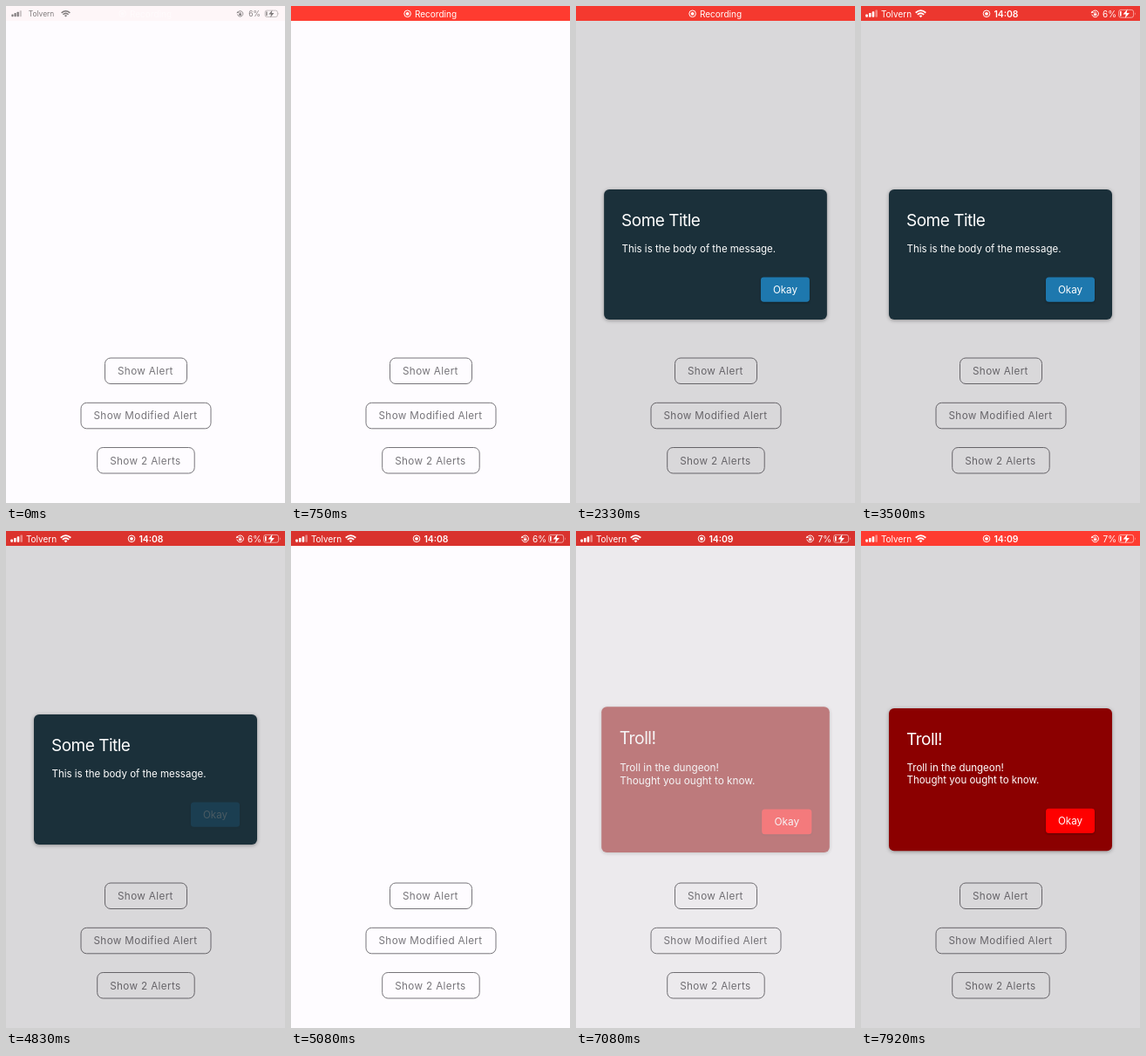
An HTML page for the animation above (8000 ms loop, 320 by 569 pixels).

```html
<!DOCTYPE html>
<html lang="en">
<head>
<meta charset="utf-8">
<title>Alert demo</title>
<style>
  html, body { margin: 0; width: 100%; height: 100%; overflow: hidden; background: #fefcff; }
  svg { display: block; width: 100vw; height: 100vh; font-family: Inter, Roboto, sans-serif; }
  .label { font-size: 11.7px; letter-spacing: .36px; fill: #77757a; }
  .title { font-size: 19px; letter-spacing: -.5px; fill: #fff; }
  .body { font-size: 11.5px; fill: #fff; }
  .small { font-size: 10px; fill: currentColor; }
  .clock { font-size: 10.4px; font-weight: 600; fill: currentColor; }
  .card { filter: drop-shadow(0 1.5px 2px rgba(0, 0, 0, .35)); }
  .key { filter: drop-shadow(0 1px 1px rgba(0, 0, 0, .3)); }
</style>
</head>
<body>
<svg id="stage" viewBox="0 0 320 569"></svg>
<script>
const LOOP = 8000;
const MID = 284.5;

const button = (id, x, y, w, label) => `
  <g id="${id}">
    <rect x="${x}" y="${y}" width="${w}" height="29.5" rx="6.5" fill="none" stroke="#77757a"/>
    <text class="label" x="${x + 14.5}" y="${y + 19}">${label}</text>
  </g>`;

const alertBox = (id, top, h, fill, keyFill, title, lines) => `
  <g id="${id}">
    <rect class="card" x="32" y="${top}" width="256" height="${h}" rx="6" fill="${fill}"/>
    <text class="title" x="52" y="${top + 42}">${title}</text>
    ${lines.map((s, i) => `<text class="body" x="52.5" y="${top + 72 + i * 14.5}">${s}</text>`).join('')}
    <g id="${id}Key">
      <rect class="key" x="212" y="${top + h - 48.5}" width="56" height="28.2" rx="3.5" fill="${keyFill}"/>
      <text x="240" y="${top + h - 30.2}" text-anchor="middle" font-size="11.6" fill="#fff">Okay</text>
    </g>
  </g>`;

const item = (cx, inner) => `<g class="item" data-cx="${cx}">${inner}</g>`;

const recIcon = x => `
  <circle cx="${x}" cy="8.8" r="3.8" fill="none" stroke="currentColor"/>
  <circle cx="${x}" cy="8.8" r="1.9" fill="currentColor"/>`;

const bars = [0, 1, 2, 3].map(i => {
  const h = 3.2 + i * 1.7;
  return `<rect x="${5.3 + i * 3.7}" y="${12.8 - h}" width="2.6" height="${h}" rx=".7"
    fill="currentColor" opacity="${i < 3 ? 1 : .4}"/>`;
}).join('');

const wifi = `
  <g fill="none" stroke="currentColor" stroke-width="1.8">
    <path d="M62.7 7.7Q68.5 2.6 74.3 7.7"/>
    <path d="M64.8 9.9Q68.5 6.6 72.2 9.9"/>
  </g>
  <path d="M66.6 11.3Q68.5 9.6 70.4 11.3L68.5 13.2Z" fill="currentColor"/>`;

const lock = `
  <path d="M265.3 7A3.8 3.8 0 1 1 264.9 9.6" fill="none" stroke="currentColor"/>
  <path d="M263.6 8.2L265 5.6L267 7.6Z" fill="currentColor"/>
  <rect x="266.9" y="8.5" width="3.4" height="2.5" rx=".4" fill="currentColor"/>
  <path d="M267.6 8.6V7.8a1 1 0 0 1 2 0V8.6" fill="none" stroke="currentColor" stroke-width=".7"/>`;

const battery = `
  <rect x="295.6" y="4.4" width="17" height="8.8" rx="2.4" fill="none" stroke="currentColor" stroke-width=".9" opacity=".6"/>
  <path d="M314 7.2q1.4 1.6 0 3.2z" fill="currentColor" opacity=".6"/>
  <rect x="297" y="5.8" width="1.6" height="6" rx=".7" fill="currentColor"/>
  <path d="M305.6 3.6L300.6 9.5H303.8L302.8 14L307.9 7.9H304.7Z" fill="currentColor"/>`;

document.getElementById('stage').innerHTML = `
  <rect width="320" height="569" fill="#fefcff"/>
  ${button('showOne', 113.5, 403, 94, 'Show Alert')}
  ${button('showMod', 86, 454.3, 149, 'Show Modified Alert')}
  ${button('showTwo', 104.7, 505.5, 111.5, 'Show 2 Alerts')}
  <rect id="scrim" y="17" width="320" height="552" fill="#000"/>
  ${alertBox('plain', 210, 149, '#1b303a', '#1e78ae', 'Some Title', ['This is the body of the message.'])}
  ${alertBox('troll', 203, 163.3, '#8b0000', '#fe0000', 'Troll!', ['Troll in the dungeon!', 'Thought you ought to know.'])}
  <rect id="bar" width="320" height="17"/>
  <g id="rec" color="#fff">
    ${recIcon(133.6)}
    <text class="small" x="142" y="12.5">Recording</text>
  </g>
  <g id="status">
    ${item(12, bars)}
    ${item(40.5, '<text class="small" x="40.5" y="12.5" text-anchor="middle">Tolvern</text>')}
    ${item(68.5, wifi)}
    <g id="time">${item(162, recIcon(144) + '<text id="clock" class="clock" x="152.4" y="12.6"></text>')}</g>
    ${item(268.5, lock)}
    ${item(285, '<text id="charge" class="small" x="293" y="12.5" text-anchor="end"></text>')}
    ${item(305, battery)}
  </g>`;

const el = {};
document.querySelectorAll('[id]').forEach(n => el[n.id] = n);
const items = document.querySelectorAll('.item');

const ramp = (t, from, len) => Math.min(1, Math.max(0, (t - from) / len));
const ease = p => p < .5 ? 2 * p * p : 1 - 2 * (1 - p) * (1 - p);
const mix = (a, b, p) => a + (b - a) * p;
const fade = (node, o) => {
  node.setAttribute('opacity', o.toFixed(4));
  node.style.display = o > 0 ? '' : 'none';
};
const zoom = (node, cx, cy, s) =>
  node.setAttribute('transform', `translate(${cx} ${cy}) scale(${s}) translate(${-cx} ${-cy})`);

// Dim quickly on touch, come back more slowly on release.
const touch = (t, down, up) =>
  1 - .8 * (ease(ramp(t, down, 150)) - ease(ramp(t, up, 250)));

// Underdamped spring from .57 to 1.
const spring = ms => {
  const s = Math.max(0, ms) / 1000, k = 14, w = 15;
  return 1 - .43 * Math.exp(-k * s) * (Math.cos(w * s) + k / w * Math.sin(w * s));
};

function popup(node, t, open, close) {
  const o = ease(ramp(t, open, 400)) * (1 - ramp(t, close, 145));
  fade(node, o);
  zoom(node, 160, MID, spring(t - open));
  return o;
}

function drawStatus(t) {
  const dim = t < 2000 ? 0 : (1 - Math.cos(t / 1000 * Math.PI)) / 2;
  const rgb = [[255, 216], [59, 50], [48, 45]].map(([a, b]) => Math.round(mix(a, b, dim)));
  el.bar.setAttribute('fill', `rgb(${rgb})`);
  fade(el.bar, mix(.03, 1, ease(ramp(t, 0, 450))));
  fade(el.rec, mix(.5, 1, ramp(t, 0, 350)) * (1 - ramp(t, 2920, 160)));

  const leaving = t < 1500;
  const p = leaving ? 1 - ramp(t, 0, 160) : ease(ramp(t, 3000, 250));
  fade(el.status, leaving ? .5 * p : p);
  el.status.setAttribute('color', leaving ? '#000' : '#fff');
  el.time.style.display = leaving ? 'none' : '';
  const s = leaving ? mix(.7, .84, p) : mix(.7, 1, p);
  items.forEach(n => zoom(n, +n.dataset.cx, 9, s));

  const late = t >= 5400;
  el.clock.textContent = late ? '14:09' : '14:08';
  el.charge.textContent = late ? '7%' : '6%';
}

function update(t) {
  drawStatus(t);
  fade(el.showOne, touch(t, 1500, 1930));
  fade(el.showMod, touch(t, 6450, 6870));
  fade(el.plainKey, touch(t, 4580, 4850));
  const shown = popup(el.plain, t, 1930, 4850) + popup(el.troll, t, 6886, LOOP);
  fade(el.scrim, .145 * shown);
}

const start = performance.now();
function tick() {
  update((performance.now() - start) % LOOP);
  requestAnimationFrame(tick);
}
tick();
</script>
</body>
</html>
```
